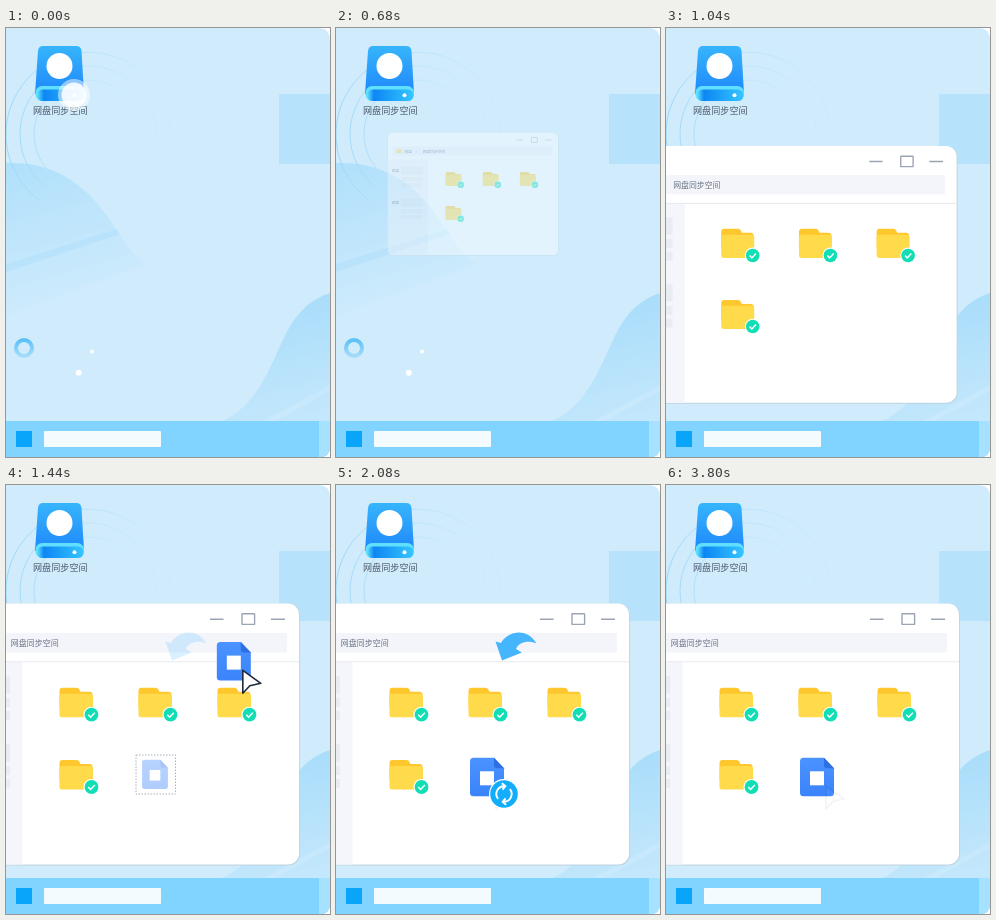
An HTML page for the animation above (4000 ms loop, 324 px wide and 429 px high).

```html
<!DOCTYPE html>
<html lang="zh-CN">
<head>
<meta charset="utf-8">
<title>网盘同步空间</title>
<style>
  html, body { margin: 0; width: 100%; height: 100%; overflow: hidden; background: #fff; }
  svg { display: block; width: 100%; height: 100%; }
  text { font-family: "Noto Sans CJK SC", "Noto Sans CJK", sans-serif; }
</style>
</head>
<body>
<svg viewBox="0 0 324 429">
  <defs>
    <linearGradient id="hillLeft" x1="0" y1="0" x2=".25" y2="1">
      <stop stop-color="#b0e0fb"/><stop offset="1" stop-color="#cfebfc"/>
    </linearGradient>
    <linearGradient id="hillRight" x1=".4" y1="0" x2=".6" y2="1">
      <stop stop-color="#a6dcfa"/><stop offset="1" stop-color="#c3e7fc"/>
    </linearGradient>
    <linearGradient id="ringFade">
      <stop stop-color="#9cd8f8"/><stop offset="1" stop-color="#c4e7fb" stop-opacity=".3"/>
    </linearGradient>
    <linearGradient id="donut" x2="0" y2="1">
      <stop stop-color="#5cc1f8"/><stop offset="1" stop-color="#a5dcf9"/>
    </linearGradient>
    <linearGradient id="driveTop" x2="0" y2="1">
      <stop stop-color="#36b5fc"/><stop offset="1" stop-color="#1f87fb"/>
    </linearGradient>
    <linearGradient id="driveBase">
      <stop stop-color="#5fe3ff"/><stop offset=".15" stop-color="#0d86f3"/><stop offset="1" stop-color="#35c6ff"/>
    </linearGradient>
    <linearGradient id="docBlue" x2="0" y2="1">
      <stop stop-color="#4b93ff"/><stop offset="1" stop-color="#3a83fa"/>
    </linearGradient>
    <clipPath id="stage"><path d="M0 0H312Q324 0 324 12V419Q324 429 314 429H0Z"/></clipPath>
    <clipPath id="panel"><rect x="-70" y="118.5" width="363" height="261" rx="11"/></clipPath>

    <g id="check">
      <circle r="8" fill="#fff"/><circle r="6.9" fill="#12deb5"/>
      <path d="M-3.2 .1L-.9 2.5 3.3-2" fill="none" stroke="#fff" stroke-width="1.5"/>
    </g>
    <g id="folder">
      <path d="M0 3Q0 0 3 0H17Q19 0 20 2L21 4H30Q33 4 33 7V20H0Z" fill="#ffc72e"/>
      <rect y="6" width="33.5" height="23.5" rx="2.5" fill="#ffda4a"/>
      <use href="#check" x="32" y="27"/>
    </g>
    <g id="doc">
      <path d="M-17-16Q-17-19.5-13.5-19.5H7L17-9V15.5Q17 19 13.5 19H-13.5Q-17 19-17 15.5Z" fill="url(#docBlue)"/>
      <path d="M7-19.5L17-9H10Q7-9 7-12Z" fill="#2f6fe4"/>
      <rect x="-7" y="-6" width="14" height="14" fill="#fff"/>
    </g>
  </defs>

  <g clip-path="url(#stage)">
    <rect width="324" height="429" fill="#cfebfc"/>
    <path d="M0 135C48 133 78 156 101 188C116 210 125 226 140 236L0 288Z" fill="url(#hillLeft)"/>
    <path d="M0 236L111 201 114 206 0 244Z" fill="#a4daf9" opacity=".35"/>
    <path d="M216 393C249 379 262 344 277 312C288 288 302 272 324 265V393Z" fill="url(#hillRight)"/>
    <path d="M258 393L324 357V363L269 393Z" fill="#fff" opacity=".12"/>
    <g fill="none" stroke="url(#ringFade)">
      <path id="ringArc" d="M33 172A82 82 0 1 1 164 106"/>
      <path d="M37 157A68 68 0 1 1 150 106" opacity=".85"/>
      <path d="M40 140A54 54 0 1 1 136 106" opacity=".65"/>
    </g>
    <rect x="273" y="66" width="70" height="70" fill="#b6e3fb"/>
    <circle cx="18" cy="320" r="8" fill="none" stroke="url(#donut)" stroke-width="4"/>
    <circle cx="86" cy="323.5" r="2" fill="#fff"/>
    <circle cx="72.8" cy="344.8" r="3" fill="#fff"/>

    <path d="M37 18H70Q75 18 75.5 23L78 66H29L32 23Q32.500 18 37 18Z" fill="url(#driveTop)"/>
    <rect x="29.500" y="58" width="48.500" height="15" rx="6.500" fill="#5fe0ff"/>
    <rect x="31" y="61.500" width="46.500" height="11.500" rx="5.500" fill="url(#driveBase)"/>
    <circle cx="53.500" cy="38" r="13" fill="#fff"/>
    <circle cx="68.500" cy="67.300" r="2" fill="#fff"/>
    <text x="27" y="86.300" font-size="9.100" fill="#4c5868">网盘同步空间</text>
    <g id="press" fill="#fff">
      <circle r="16" opacity=".5"/><circle r="12.500" opacity=".85"/>
    </g>

    <g id="window">
      <rect x="-70" y="118.500" width="363.800" height="262" rx="11" fill="#bfd3e0"/>
      <g clip-path="url(#panel)">
        <rect x="-70" y="118" width="363" height="262" fill="#fff"/>
        <rect x="-59" y="148" width="340" height="19.500" rx="1" fill="#f4f5fa"/>
        <rect x="-70" y="177" width="86.500" height="203" fill="#f5f6fb"/>
        <path d="M-70 176.800H293" stroke="#e6e9ef"/>
        <g id="sidebar" fill="#eaecf3"></g>
        <path d="M204 134.200H217.500M265 134.200H279" stroke="#9ba4b3" stroke-width="1.400"/>
        <rect x="236" y="128.800" width="12.600" height="10.600" rx=".5" fill="none" stroke="#9ba4b3" stroke-width="1.400"/>
        <rect x="-51" y="154" width="10" height="8" rx="1" fill="#ffd84a"/>
        <g font-size="8" font-weight="500" fill="#687184">
          <text x="-34" y="161">网盘</text><text x="-9" y="161">›</text>
          <text x="4.700" y="161">网盘同步空间</text>
          <text x="-61" y="203">网盘</text><text x="-61" y="271">网盘</text>
        </g>
        <use href="#folder" x="53.500" y="202.700"/>
        <use href="#folder" x="132.500" y="202.700"/>
        <use href="#folder" x="211.500" y="202.700"/>
        <use href="#folder" x="53.500" y="275"/>
      </g>
    </g>

    <g id="slot">
      <rect x="130" y="270" width="39.500" height="39" fill="none" stroke="#a8b2c0" stroke-dasharray="1.500 1.500"/>
      <use href="#doc" transform="translate(149 289.500) scale(.76)" opacity=".4"/>
    </g>
    <path id="arrow" d="M159.500 156.500L165 158C171 147 190 141 200.500 158.500C192 155 183 157 180 164L186 167.500 166 175.500Z" fill="#45b6fd"/>
    <use id="file" href="#doc"/>
    <path id="cursor" d="M0 0V23L7 15.500 18 13Z" fill="#fff" stroke="#202a3c" stroke-width="1.600" stroke-linejoin="round"/>
    <g id="sync">
      <circle r="15" fill="#fff"/><circle r="13.800" fill="#12adfb"/>
      <g id="spinner" fill="none" stroke="#fff" stroke-width="1.900">
        <path d="M-7.500-1.500A7.700 7.700 0 0 1 6-4.800M7-8.500V-4H2.500"/>
        <path d="M7.500 1.500A7.700 7.700 0 0 1-6 4.800M-7 8.500V4H-2.500"/>
      </g>
    </g>
    <use id="done" href="#check"/>

    <rect y="393" width="324" height="36" fill="#81d4ff"/>
    <rect x="313" y="393" width="11" height="36" fill="#a6e1ff"/>
    <rect x="10" y="403" width="16" height="16" fill="#08a5fb"/>
    <rect x="38" y="403" width="117" height="16" rx="1" fill="#f4fbff"/>
  </g>
</svg>
<script>
const LOOP = 4000;
const part = id => document.getElementById(id);
const ramp = (t, from, to) => Math.min(1, Math.max(0, (t - from) / (to - from)));
const smooth = p => (1 - Math.cos(Math.PI * p)) / 2;
const mix = (a, b, p) => a + (b - a) * p;

function place(id, opacity, x = 0, y = 0, scale = 1) {
  const el = part(id);
  el.setAttribute('opacity', opacity);
  el.setAttribute('transform', `translate(${x} ${y}) scale(${scale})`);
}

for (const top of [191, 259]) {
  for (const [dy, height] of [[0, 17.5], [22, 9], [35, 9]]) {
    const bar = document.createElementNS('http://www.w3.org/2000/svg', 'rect');
    const box = { x: -42, y: top + dy, width: 46, height };
    for (const key in box) bar.setAttribute(key, box[key]);
    part('sidebar').append(bar);
  }
}

// Quadratic path of the dragged file, by its centre.
function dragPoint(u) {
  const along = (a, b, c) => (1 - u) ** 2 * a + 2 * u * (1 - u) * b + u * u * c;
  return [along(345, 175, 151), along(118, 175, 292.3)];
}

function draw(t) {
  const release = ramp(t, 200, 600);
  place('press', 1 - release, 68, 67, 1 - .2 * release);

  const zoom = 1 - (1 - ramp(t, 680, 1065)) ** 1.25;
  const scale = mix(170 / 363, 1, zoom);
  place('window', ramp(t, 600, 800),
    mix(52, -70, zoom) + 70 * scale, mix(104.5, 118.5, zoom) - 118.5 * scale, scale);

  const [x, y] = dragPoint(smooth(ramp(t, 1140, 1810)));
  place('slot', ramp(t, 1300, 1430) * (1 - ramp(t, 1740, 1810)));
  place('arrow', ramp(t, 1390, 1640) * (1 - ramp(t, 2200, 2440)));
  place('file', t > 1140 ? 1 : 0, x, y);
  place('cursor', t > 1140 ? mix(1, .05, ramp(t, 1800, 1880)) : 0, x + 9, y + 8.7);

  const appear = smooth(ramp(t, 1790, 1910));
  const swap = smooth(ramp(t, 2650, 2840));
  place('sync', appear * (1 - swap), 168, 309, mix(.6, 1, appear) * mix(1, .6, swap));
  part('spinner').setAttribute('transform', `rotate(${360 * ramp(t, 1880, 2440)})`);
  place('done', t < 3800 ? swap : 0, 168, 309, mix(1.5, 1.1, swap));
}

const start = performance.now();
function frame(now) {
  draw(Math.max(0, now - start) % LOOP);
  requestAnimationFrame(frame);
}
draw(0);
requestAnimationFrame(frame);
</script>
</body>
</html>
```
